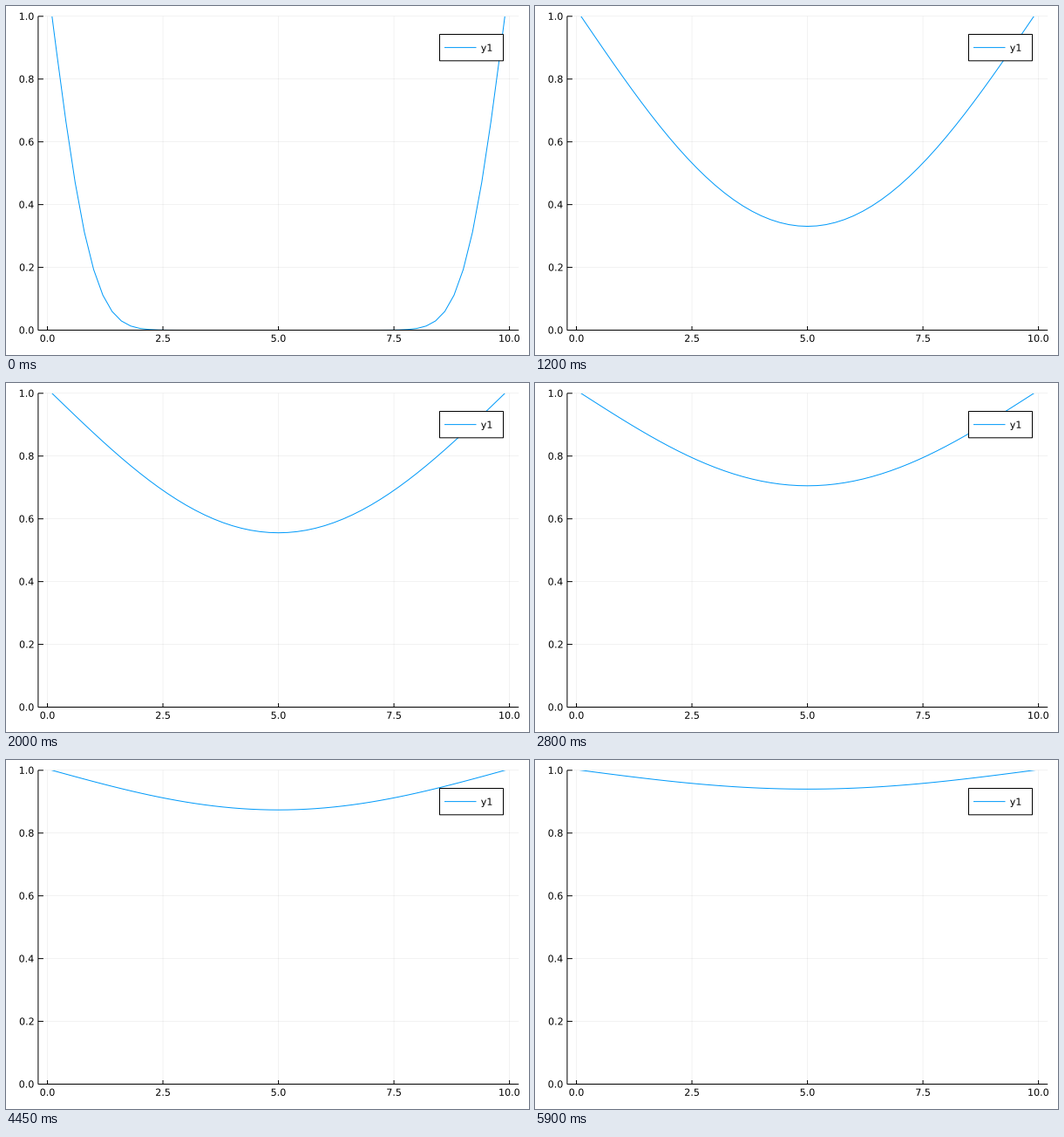
A matplotlib script for the animation above (5.95 s loop, 600 px wide and 400 px high).

```python
import numpy as np
import matplotlib.pyplot as plt
from matplotlib.animation import FuncAnimation
from matplotlib.patches import PathPatch, Rectangle
from matplotlib.textpath import TextPath
from matplotlib.transforms import Affine2D

W, H, DPI = 600, 400, 100
FRAMES, INTERVAL = 119, 50
PX = 72 / DPI                      # one pixel in points
FONT_PX = 8 / PX
LEFT, RIGHT, TOP, BOTTOM = 36.9, 588.2, 11.8, 371.5
BLUE = "#009afa"

plt.rcParams["font.family"] = "DejaVu Sans"


def sx(x):
    return LEFT + (np.asarray(x) + 0.2) / 10.4 * (RIGHT - LEFT)


def sy(y):
    return BOTTOM - np.asarray(y) * (BOTTOM - TOP)


def diffuse(cells=51, r=0.25, first=24, every=25):
    """Explicit heat equation; ghost cells hold both walls at 1."""
    u = np.zeros(cells)
    u[0] = u[-1] = 2
    states = []
    for step in range(1, first + every * (FRAMES - 1) + 1):
        u[1:-1] += r * (u[2:] - 2 * u[1:-1] + u[:-2])
        u[0], u[-1] = 2 - u[1], 2 - u[-2]
        if step >= first and (step - first) % every == 0:
            states.append(u.copy())
    return states


fig = plt.figure(figsize=(W / DPI, H / DPI), dpi=DPI, facecolor="white")
ax = fig.add_axes([0, 0, 1, 1])
ax.set(xlim=(0, W), ylim=(H, 0))
ax.axis("off")


def segment(x0, y0, x1, y1, color="black", width=1, alpha=1, z=4):
    ax.plot([x0, x1], [y0, y1], color=color, lw=width * PX, alpha=alpha,
            zorder=z, solid_capstyle="butt", snap=False)


def grid_line(x0, y0, x1, y1):
    segment(x0, y0, x1, y1, width=0.5, alpha=0.1, z=1)


def label(x, y, text, align, z=4):
    """Text as outlines, so that it keeps its sub-pixel position."""
    path = TextPath((0, 0), text, size=FONT_PX)
    box = path.get_extents()
    anchor = box.x0 + align * box.width
    place = Affine2D().translate(-anchor, 0).scale(1, -1).translate(x, y)
    ax.add_patch(PathPatch(place.transform_path(path), fc="black", lw=0,
                           zorder=z, snap=False))


for v in np.arange(0, 10.1, 2.5):
    x = sx(v)
    grid_line(x, TOP, x, BOTTOM)
    segment(x, BOTTOM, x, BOTTOM - 4.5)
    label(x, 384.8, f"{v:.1f}", 0.5)

for v in np.linspace(0, 1, 6):
    y = sy(v)
    grid_line(LEFT, y, RIGHT, y)
    segment(LEFT, y, LEFT + 6, y)
    label(31.6, y + 4, f"{v:.1f}", 1)

segment(LEFT, TOP, LEFT, BOTTOM)
segment(LEFT, BOTTOM, RIGHT, BOTTOM)

# Legend
ax.add_patch(Rectangle((497.5, 32.5), 73, 30.3, fc="white", ec="black",
                       lw=PX, zorder=6, snap=False))
segment(503, 47.6, 539.5, 47.6, BLUE, z=7)
label(545.1, 51.7, "y1", 0, 7)

states = diffuse()
curve, = ax.plot(sx(np.linspace(0, 10, 51)), sy(states[0]), color=BLUE,
                 lw=PX, zorder=3, solid_joinstyle="round", snap=False)
curve.set_clip_path(Rectangle((LEFT, TOP), RIGHT - LEFT, BOTTOM - TOP,
                              transform=ax.transData))


def update(i):
    curve.set_ydata(sy(states[i]))
    return curve,


anim = FuncAnimation(fig, update, frames=FRAMES, interval=INTERVAL,
                     repeat=True, repeat_delay=0, blit=False)
plt.show()
```
